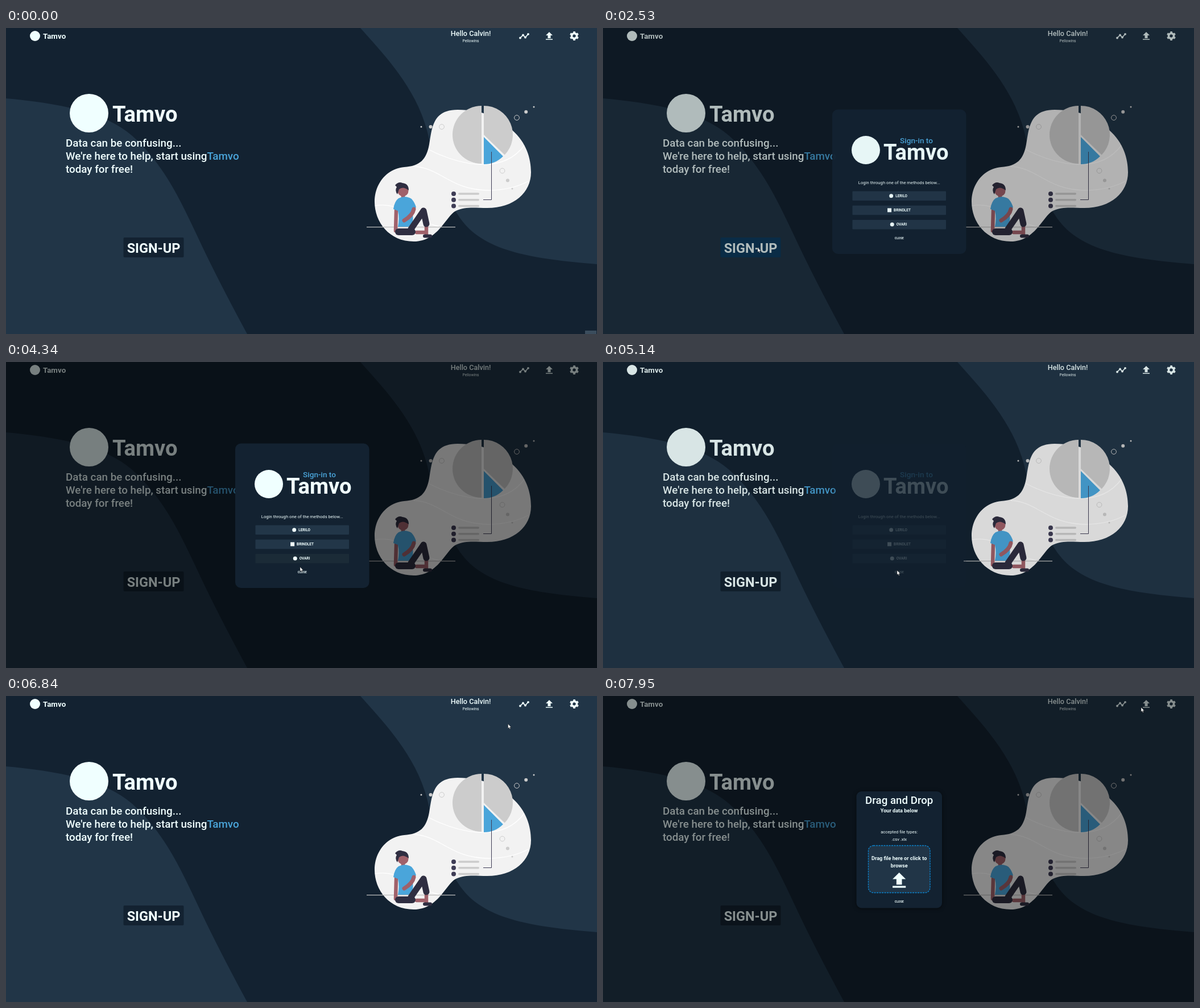
Animation of 1039x539 px, one loop 8000 ms. Source, as an HTML page:

```html
<!DOCTYPE html>
<html lang="en">
<head>
<meta charset="utf-8">
<title>Sign-up page</title>
<style>
html, body { margin: 0; width: 100%; height: 100%; overflow: hidden; background: #132231; }
svg { display: block; }
text { font-family: Roboto, "Open Sans", sans-serif; font-weight: 500; fill: azure; }
.b { font-weight: 700; }
.r { font-weight: 400; }
.m { text-anchor: middle; }
.white { fill: azure; }
.blue { fill: #4aa5da; }
.navy { fill: #132231; }
.slate { fill: #213547; }
.grey { fill: #ccc; }
.ring { fill: none; stroke: #ccc; }
.limb { fill: none; stroke-linecap: round; stroke-linejoin: round; }
</style>
</head>
<body>
<svg width="1039" height="539" viewBox="0 0 1039 539">
  <defs>
    <path id="upload" d="M6 0L12 6H8.5V11H3.5V6H0ZM0 12.2H12V13.8H0Z"/>
  </defs>

  <rect class="navy" width="1039" height="539"/>
  <path class="slate" d="M0 124C90 132 175 148 222 190C275 238 303 295 338 370Q370 439 424 539H0Z"/>
  <path class="slate" d="M623 0C665 47 720 105 740 180C757 248 765 285 795 330C835 393 920 406 1039 416V0Z"/>

  <!-- top bar -->
  <circle class="white" cx="51" cy="14" r="9"/>
  <text class="b" x="65" y="19" font-size="13.4">Tamvo</text>
  <g class="m" transform="translate(817 0)">
    <text y="13.5" font-size="12.6">Hello Calvin!</text>
    <text class="r" y="25" font-size="6.8">Pellowins</text>
  </g>
  <path id="trend" fill="none" stroke="azure" stroke-width="1.6"/>
  <use class="white" href="#upload" x="949" y="7"/>
  <g transform="translate(999 14) rotate(30)" fill="none" stroke="azure">
    <circle r="4.5" stroke-width="3.6"/>
    <circle r="6.8" stroke-width="2.4" pathLength="12" stroke-dasharray="1" stroke-dashoffset=".5"/>
  </g>

  <!-- headline -->
  <circle class="white" cx="146" cy="150" r="34"/>
  <text class="b" x="187" y="165" font-size="38.2">Tamvo</text>
  <g transform="translate(105 209)" font-size="18.8">
    <text>Data can be confusing...</text>
    <text y="23">We're here to help, start using<tspan class="blue">Tamvo</tspan></text>
    <text y="46">today for free!</text>
  </g>
  <rect id="signup" x="206.5" y="369" width="106" height="35" rx="2"/>
  <text class="b m" x="259.5" y="395.5" font-size="23.5">SIGN-UP</text>

  <!-- illustration -->
  <path fill="#f2f2f2" d="M648 306C648 272 672 247 700 245S739 232 744 205S749 144 794 144S865 158 890 180S923 230 923 254C923 290 893 317 846 317C825 317 808 314 791 322S760 376 717 376S648 342 648 306Z"/>
  <g fill="none" stroke="#fff" stroke-width="1.3">
    <path d="M743 214C790 238 870 262 911 207"/>
    <path d="M717 244C765 246 780 286 850 286Q890 285 918 270"/>
    <path d="M649 313C695 306 705 335 762 350"/>
  </g>
  <g id="chart"></g>
  <path d="M853.5 218V302.500H839" fill="none" stroke="#3f3d56"/>
  <path d="M634 350.7H790" stroke="#bcbcbc" stroke-width="1.2"/>

  <!-- seated figure -->
  <g class="limb" stroke="#a0616a" stroke-width="6.5">
    <path d="M686 321L685 357M698 292V300M722 360H735M739 346V363"/>
  </g>
  <circle cx="698" cy="287" r="9.5" fill="#a0616a"/>
  <path fill="#2f2e41" d="M684 277Q690 270 697 273Q708 274 708 286Q698 278 691 284L688 293Q683 286 687 280Z"/>
  <path class="blue" d="M690 300Q702 294 713 301Q719 308 721 316L714 321Q718 338 712 350H689Q692 335 689 322L681 319Q683 305 690 300Z"/>
  <g class="limb" stroke="#2f2e41">
    <path d="M690 359H714" stroke-width="12"/>
    <path d="M712 354L734 322L739 345" stroke-width="11"/>
    <path d="M736 366.5H746" stroke-width="6"/>
  </g>
  <path class="limb" d="M717 319Q715 330 700 339" stroke="#a0616a" stroke-width="7"/>

  <rect id="shade" width="1039" height="539"/>

  <!-- sign-in dialog -->
  <g id="login">
    <rect class="navy" x="403" y="143.5" width="235.5" height="254.5" rx="10"/>
    <circle class="white" cx="462" cy="215" r="25"/>
    <text class="blue" x="522" y="203" font-size="13.6">Sign-in to</text>
    <text class="b" x="493" y="232" font-size="38.2">Tamvo</text>
    <g id="methods"></g>
    <g class="m" transform="translate(520.7 0)">
      <text class="r" y="275" font-size="7.7">Login through one of the methods below...</text>
      <text class="b" y="372.3" font-size="5.3">CLOSE</text>
    </g>
  </g>

  <!-- upload dialog -->
  <g id="drop" class="m" transform="translate(520.7 168)">
    <rect class="navy" x="-75.2" width="150.5" height="205.5" rx="9" style="filter:drop-shadow(0 1px 3px #0008)"/>
    <text y="22" font-size="18.7">Drag and Drop</text>
    <text class="b" y="37" font-size="9.1">Your data below</text>
    <g font-size="7.6">
      <text class="r" y="73.5">accepted file types:</text>
      <text class="r" y="86.5">.csv .xlx</text>
    </g>
    <rect class="slate" x="-54.2" y="95.5" width="108.5" height="83" rx="9" stroke="#0a84d0" stroke-width="1.3" stroke-dasharray="3 1.5"/>
    <g font-size="9.1">
      <text class="b" y="121">Drag file here or click to</text>
      <text class="b" y="134">browse</text>
    </g>
    <use class="white" href="#upload" transform="translate(-11.6 143) scale(1.93)"/>
    <text class="b" y="196" font-size="5.3">CLOSE</text>
  </g>

  <rect id="badge" x="1018" y="533" width="20" height="6" fill="#3b4d5d"/>
  <g id="cursor" stroke="#222" stroke-width=".5" fill="#fff">
    <path id="arrow" d="M0 0V7.8L1.8 6.3L3 9L4.3 8.4L3.1 5.8H5.5Z"/>
    <path id="hand" d="M-.5 1Q.5-.4 1.3 1V3.3L4.8 4.5L4 9.5H.5L-2 6L-.5 5.7Z"/>
  </g>
</svg>
<script>
const LOOP = 8000, STEP = 100, OFFSET = 20;
const LOGIN_OPEN = 2280, LOGIN_CLOSE = 4920, DROP_OPEN = 7520;
const $ = id => document.getElementById(id);

// Where the pointer turns or rests: [time, x, y].
const STOPS = [
  [320, 1030, 531], [920, 450, 405], [1120, 379, 393], [1820, 272, 387],
  [2620, 272, 387], [3820, 535, 291], [4320, 517, 361], [4720, 517, 367],
  [5220, 517, 367], [5620, 604, 313], [6620, 856, 64], [7320, 949, 12], [7520, 946, 20]
];

const circle = (x, y, r, attrs) => `<circle cx="${x}" cy="${y}" r="${r}" ${attrs}/>`;

// Pie slice between two angles in degrees.
function slice(x, y, r, from, to, cls) {
  const rim = deg => {
    const a = deg * Math.PI / 180;
    return `${x + r * Math.cos(a)} ${y + r * Math.sin(a)}`;
  };
  return `<path class="${cls}" d="M${x} ${y}L${rim(from)}A${r} ${r} 0 0 1 ${rim(to)}Z"/>`;
}

// Three bubbles growing along a line, the last one hollow.
const bubbles = (x, y, dx, dy) =>
  circle(x, y, 1.5, 'class="grey"') +
  circle(x + dx * .46, y + dy * .46, 3, 'class="grey"') +
  circle(x + dx, y + dy, 4.4, 'class="ring"');

const legend = i => {
  const y = 292 + 10.7 * i;
  return circle(787, y, 4, 'fill="#3f3d56"') +
    `<rect class="grey" x="795" y="${y - 1.7}" width="37" height="3.5" rx="1.7"/>`;
};

const methodY = i => 287.5 + 25.2 * i;
const method = (name, i) => {
  const y = methodY(i), x = 523.5 - name.length * 1.55;
  return `<rect class="method" x="438.5" y="${y}" width="164.5" height="16.5" rx="1"/>
    <rect class="white" x="${x - 11}" y="${y + 4.7}" width="7" height="7" rx="${i === 1 ? 0 : 3.5}"/>
    <text class="b" x="${x}" y="${y + 10.5}" font-size="6.4">${name}</text>`;
};

$("chart").innerHTML =
  slice(836, 188, 51, 90, 270, "grey") +
  slice(840, 188, 51, -90, 44, "grey") +
  slice(840, 192, 48, 45, 90, "blue") +
  bubbles(730, 174, 36, 0) + bubbles(928, 139, -30, 19) + bubbles(890, 283, -17.5, -31.5) +
  [0, 1, 2].map(legend).join("");
$("methods").innerHTML = ["LERILO", "BRINDLET", "OVARI"].map(method).join("");

const trend = [[904, 17.5], [909, 12.5], [913, 16.5], [918, 10.8]];
$("trend").setAttribute("d", "M" + trend.join("L"));
$("trend").insertAdjacentHTML("afterend", trend.map(([x, y]) => circle(x, y, 1.9, 'class="white"')).join(""));
const methodBoxes = document.querySelectorAll(".method");

const ramp = (t, start, length) => Math.min(1, Math.max(0, (t - start) / length));
const mix = (a, b, k) => `rgb(${a.map((v, i) => Math.round(v + (b[i] - v) * k))})`;
const show = (id, on) => $(id).style.display = on ? "" : "none";

function pointer(t) {
  const i = STOPS.findIndex(s => s[0] > t);
  if (i < 1) return STOPS.at(i).slice(1);
  const [t0, x0, y0] = STOPS[i - 1], [t1, x1, y1] = STOPS[i];
  const k = ramp(t, t0, t1 - t0);
  return [x0 + (x1 - x0) * k, y0 + (y1 - y0) * k];
}

function overLink(x, y, shade, login) {
  const within = (left, top, w, h) => x >= left && x <= left + w && y >= top && y <= top + h;
  if (login === 1) return within(512, 365, 17, 10) || [0, 1, 2].some(i => within(438, methodY(i), 165, 16.5));
  return shade === 0 && (within(206, 369, 106, 35) || within(943, 2, 24, 24));
}

function draw(now) {
  const time = now % LOOP;
  const t = Math.floor((time - OFFSET) / STEP) * STEP + OFFSET;

  const closing = 1 - ramp(t, LOGIN_CLOSE, 250);
  const shade = (ramp(t, LOGIN_OPEN, 450) * closing + ramp(t, DROP_OPEN, 450)) / 2;
  const login = ramp(t, LOGIN_OPEN, 250) * closing;
  show("badge", time < 100);
  $("shade").style.opacity = shade;
  $("login").style.opacity = login;
  $("drop").style.opacity = ramp(t, DROP_OPEN, 250);

  const lit = ramp(t, 1420, 200) - ramp(t, LOGIN_OPEN, 340);
  $("signup").style.fill = mix([19, 34, 49], [0, 122, 204], lit);
  methodBoxes.forEach((box, i) => {
    const enter = 3820 + 150 * i;
    const hover = ramp(t, enter, 100) - ramp(t, enter + 150, 200);
    box.style.fill = mix([34, 54, 72], [24, 39, 49], hover);
  });

  const [x, y] = pointer(t);
  const hand = overLink(x, y, shade, login);
  show("cursor", t >= STOPS[0][0]);
  show("hand", hand);
  show("arrow", !hand);
  $("cursor").setAttribute("transform", `translate(${x} ${y})`);
}

const start = performance.now();
function tick() {
  draw(performance.now() - start);
  requestAnimationFrame(tick);
}
tick();
</script>
</body>
</html>
```
